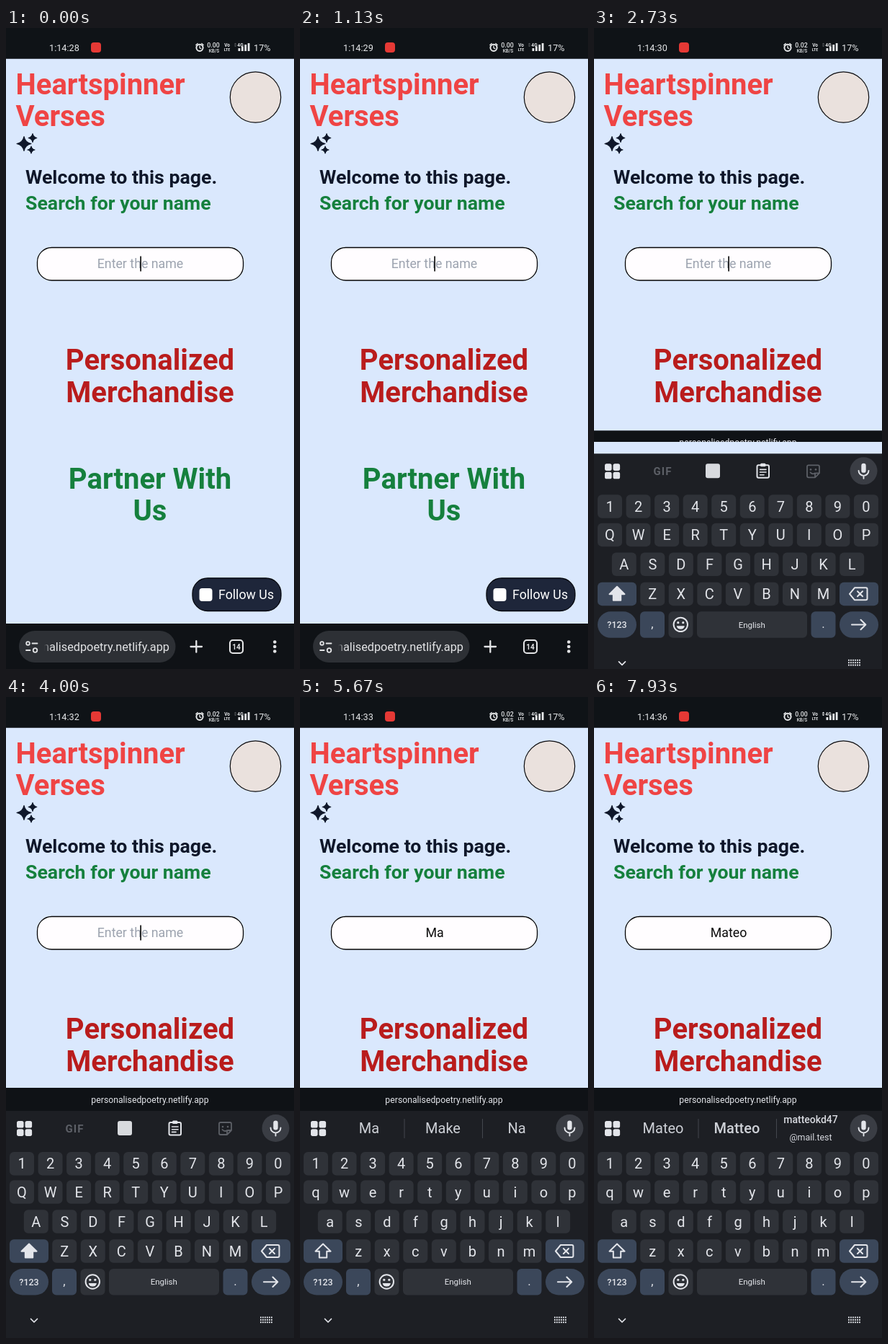
These frames come from a looping animation (400 by 889 pixels, 8000 ms). An HTML page:

```html
<!DOCTYPE html>
<html lang="en">
<head>
<meta charset="utf-8">
<title>Name search</title>
<style>
  html, body { margin: 0; width: 100%; height: 100%; overflow: hidden; background: #0f1317; }
  svg { display: block; width: 100%; height: 100%; font-family: Roboto, sans-serif; }
  .mid { text-anchor: middle; }
  .end { text-anchor: end; }
  .bold { font-weight: 700; }
  .med { font-weight: 500; }
  .line { fill: none; stroke-linecap: round; stroke-linejoin: round; }
</style>
</head>
<body>
<svg id="stage" viewBox="0 0 400 889" xmlns="http://www.w3.org/2000/svg"></svg>
<script>
const LOOP = 8000;
const KEY = '#2f3238', KEY_DOWN = '#50545d', BLUE = '#3b475a', INK = '#e3e5ea', BOARD = '#1d1f24';

// Steps are [time, value]; the last one reached holds.
const CLOCK = [[0, 28], [730, 29], [1800, 30], [2800, 31], [3800, 32], [4800, 33], [5800, 34], [6870, 35], [7800, 36]];
const SPEED = [[0, '0.00'], [2130, '0.02'], [6600, '0.00']];
const ARROWS = [[0, .3], [7800, 1]];
const CARET = [[0, 1], [330, 0], [830, 1], [1330, 0], [1830, 1], [2330, 0], [2430, 1], [3270, 0], [3770, 1],
  [4270, 0], [4670, 1], [5650, 0], [6060, 1], [7470, 0]];
const TYPED = [[0, ''], [4670, 'M'], [5150, 'Ma'], [6060, 'Mat'], [6500, 'Mate'], [6970, 'Mateo']];
const PRESSED = [[0, ''], [4530, 'm'], [4670, ''], [5070, 'a'], [5150, ''], [5930, 't'], [6060, ''],
  [6400, 'e'], [6500, ''], [6870, 'o'], [7000, '']];
const HINTS = {
  M: ['M', 'My', 'Me'], Ma: ['Ma', 'Make', 'Na'], Mat: ['Mat', 'Math', 'Match'],
  Mate: ['Mate', 'Matter', 'Make'], Mateo: ['Mateo', 'Matteo', 'matteokd47']
};
const SLIDE = { start: 2470, span: 400, height: 315 };

const at = (steps, t) => steps.reduce((v, s) => t >= s[0] ? s[1] : v, steps[0][1]);
const text = (x, y, size, fill, str, attrs = '') =>
  `<text x="${x}" y="${y}" font-size="${size}" fill="${fill}" ${attrs}>${str}</text>`;
const rect = (x, y, w, h, r, fill, attrs = '') =>
  `<rect x="${x}" y="${y}" width="${w}" height="${h}" rx="${r}" fill="${fill}" ${attrs}/>`;
const disc = (x, y, r, fill, attrs = '') => `<circle cx="${x}" cy="${y}" r="${r}" fill="${fill}" ${attrs}/>`;
const line = (d, color, w, attrs = '') => `<path class="line" d="${d}" stroke="${color}" stroke-width="${w}" ${attrs}/>`;
const MID = 'class="mid"', MID_BOLD = 'class="mid bold"', BOLD = 'class="bold"';

function star(x, y, r) {
  const k = r * .17;
  return `<path transform="translate(${x} ${y})" fill="#0f172a" stroke="#0f172a" stroke-width="1.2" stroke-linejoin="round"
    d="M0 ${-r}Q${k} ${-k} ${r} 0Q${k} ${k} 0 ${r}Q${-k} ${k} ${-r} 0Q${-k} ${-k} 0 ${-r}Z"/>`;
}

function statusBar() {
  const c = '#e6e8ea';
  const bars = [4, 6.5, 9, 11].map((h, i) => rect(322.5 + i * 4.4, 32 - h, 2.8, h, .6, c)).join('');
  return rect(0, 0, 400, 42.5, 0, '#0f1317') +
    text(60, 32, 12.7, c, '', 'id="clock"') +
    rect(118, 20, 14, 14, 4, '#e53935') +
    disc(269, 27.3, 4.6, 'none', `stroke="${c}" stroke-width="2"`) +
    line('M269 25v2.6l1.8 1M263.8 23.5l2.4-2M274.2 23.5l-2.4-2', c, 1.3) +
    text(288, 27, 8.8, c, '', 'id="speed" class="mid med"') +
    text(289, 33.6, 6.4, c, 'KB/S', 'class="mid med"') +
    text(307, 26.4, 6.4, c, 'Vo', MID_BOLD) + text(307, 32.4, 5.2, c, 'LTE', MID_BOLD) +
    `<path id="arrows" fill="${c}" d="M318.5 20.5l1.8 2.4h-3.6zM318.5 26.3l1.8-2.4h-3.6z"/>` +
    text(325.5, 26, 6.6, c, '4G', MID_BOLD) + bars +
    text(344, 32, 12.7, c, '17%');
}

function page() {
  return rect(0, 42.5, 400, 784, 0, '#dae8fd') +
    text(13.5, 91.5, 40, '#ef4444', 'Heartspinner', BOLD) +
    text(13.5, 136, 40, '#ef4444', 'Verses', BOLD) +
    star(25, 160.5, 10) + star(37, 152.5, 5.8) + star(35, 169, 5) +
    disc(346.5, 96, 35.2, '#eae1dd', 'stroke="#0b0b0d" stroke-width="1.2"') +
    text(27, 216, 26.7, '#0f172a', 'Welcome to this page.', BOLD) +
    text(27, 251.5, 26.7, '#15803d', 'Search for your name', BOLD) +
    rect(43.5, 304.5, 286, 45.5, 20, '#fffdff', 'stroke="#050505" stroke-width="1.3"') +
    text(186.5, 333.3, 17.8, '#9ca3af', 'Enter the name', MID + ' id="holder"') +
    text(187, 333.3, 17.8, '#0a0a0a', '', MID + ' id="entry"') +
    rect(0, 316.5, 1.6, 21, 0, '#000', 'id="caret"') +
    text(200, 474, 40, '#b91c1c', 'Personalized', MID_BOLD) +
    text(200, 518.5, 40, '#b91c1c', 'Merchandise', MID_BOLD) +
    text(200, 638.5, 40, '#15803d', 'Partner With', MID_BOLD) +
    text(200, 683, 40, '#15803d', 'Us', MID_BOLD) +
    rect(259, 763, 123, 45.5, 21, '#1e263a', 'stroke="#05070c" stroke-width="1.3"') +
    rect(268.5, 777, 18, 18, 4, '#fff') +
    text(295, 791.8, 17.8, '#fff', 'Follow Us');
}

function toolbar() {
  const c = '#e3e4e6', pill = '#2d3035';
  return rect(0, 826, 400, 63, 0, '#0f1216') +
    rect(18, 836, 217.5, 44, 22, pill) +
    `<g clip-path="url(#urlClip)">${text(227, 863.8, 16.3, c, 'personalisedpoetry.netlify.app', 'class="end"')}</g>` +
    rect(53, 842, 10, 32, 0, 'url(#fade)') +
    line('M36.5 853.5h7M28 863h5.5', c, 1.8) +
    disc(30.5, 853.5, 2.3, 'none', `stroke="${c}" stroke-width="1.8"`) +
    disc(40.5, 863, 2.8, 'none', `stroke="${c}" stroke-width="1.8"`) +
    line('M256.5 858h15.5M264.3 850.2v15.5', c, 2.3) +
    rect(311, 849, 18, 18, 4, 'none', `stroke="${c}" stroke-width="2.1"`) +
    text(320, 861.8, 10, c, '14', MID_BOLD) +
    [851.5, 858, 864.5].map(y => disc(373.3, y, 2.3, c)).join('');
}

function keyRow(letters, x, y) {
  return [...letters].map((ch, i) => {
    const cx = x + i * 39.55;
    return rect(cx - 17, y, 34, 32.5, 6, KEY, `data-cap="${ch}"`) +
      text(cx, y + 23.3, 20, INK, ch, MID + ` data-key="${ch}"`);
  }).join('');
}

function tools() {
  const dim = '#5d6067';
  return text(95.5, 603.5, 15, dim, 'GIF', 'class="mid bold" letter-spacing="1"') +
    rect(155, 588, 20, 20, 3, '#d8dade') +
    rect(226.5, 590, 16.5, 17.5, 2, 'none', `stroke="${INK}" stroke-width="2"`) +
    rect(231, 587.5, 7.5, 4.5, 1.5, INK) +
    line('M230.5 596h8.5M230.5 599.7h8.5M230.5 603.4h5.5', INK, 1.6) +
    line('M298 590h13q2 0 2 2v9l-6 6h-9q-2 0-2-2v-13q0-2 2-2zM313 601h-4q-2 0-2 2v4M300.5 600q3 3.5 6.5 1', dim, 1.8) +
    disc(301, 596, 1.3, dim) + disc(308, 596, 1.3, dim);
}

function hints() {
  return line('M145 585.5v26M253.5 585.5v26', '#44474e', 1) +
    [96, 198.5, 301].map((x, i) => text(x, 605, 20, '#cdd0d6', '', `${MID} id="hint${i}"`)).join('') +
    `<g id="mail">${text(301, 591, 14, '#d8dae0', 'matteokd47', 'class="mid med"')}
      ${text(301, 614.5, 12.4, '#d8dae0', '@mail.test', MID)}</g>`;
}

function keyboard() {
  const grid = [[15, 588], [26.5, 588], [15, 599.3], [26.5, 599.3]];
  const dots = [0, 1, 2].map(r => [0, 1, 2, 3, 4, 5].map(i =>
    rect(353 + i * 3, 859.5 + r * 3.4, 1.9, 1.9, 0, INK)).join('')).join('');
  return rect(0, 574, 400, 315, 0, BOARD) +
    grid.map(([x, y]) => rect(x, y, 9.6, 9.6, 2.6, INK)).join('') +
    `<g id="tools">${tools()}</g><g id="hints">${hints()}</g>` +
    disc(374.5, 598, 19, '#3a3d44') +
    rect(371.3, 587.5, 6.4, 13, 3.2, INK) +
    line('M367.5 597.5a7 7 0 0 0 14 0M374.5 604.5v4', INK, 1.9) +
    keyRow('1234567890', 22, 631) + keyRow('qwertyuiop', 22, 670.3) +
    keyRow('asdfghjkl', 41.8, 711.2) + keyRow('zxcvbnm', 81.2, 752.3) +
    rect(5, 752.3, 54, 32.5, 6, BLUE) +
    line('M32 758.5l10.5 10.3h-5.3v8.7h-10.4v-8.7h-5.3z', INK, 2, 'id="shift"') +
    rect(341, 752.3, 54, 32.5, 6, BLUE) +
    line('M362 760h15.500q2 0 2 2v13q0 2-2 2h-15.500l-7-8.500zM366 765l7 7M373 765l-7 7', INK, 2) +
    rect(5, 793, 54, 36.500, 18.200, BLUE) + text(32, 815.500, 12.500, INK, '?123', 'class="mid med"') +
    rect(64, 793, 34, 36.500, 6, BLUE) + text(81, 816, 17, INK, ',', MID) +
    rect(103.500, 793, 34, 36.500, 6, KEY) +
    disc(120.300, 811, 9.700, 'none', `stroke="${INK}" stroke-width="2"`) +
    disc(116.800, 808.300, 1.600, INK) + disc(123.800, 808.300, 1.600, INK) +
    `<path d="M114.800 813h11a5.500 4.500 0 0 1-11 0z" fill="${INK}"/>` +
    rect(143, 793, 153, 36.500, 6, KEY) + text(219.300, 815.200, 11.500, INK, 'English', MID) +
    rect(301.500, 793, 34, 36.500, 6, BLUE) + text(318.500, 816, 17, INK, '.', MID) +
    rect(341, 793, 54, 36.500, 18.200, BLUE) +
    line('M358 811.200h19M370.500 804.500l6.800 6.700l-6.800 6.700', INK, 2.100) +
    line('M34.500 862.500l4.500 4.500l4.500-4.500', INK, 1.700) + dots;
}

const stage = document.getElementById('stage');
stage.innerHTML = `<defs>
    <linearGradient id="fade"><stop offset="0" stop-color="#2d3035"/><stop offset="1" stop-color="#2d3035" stop-opacity="0"/></linearGradient>
    <clipPath id="urlClip"><rect x="53" y="840" width="180" height="36"/></clipPath>
    <clipPath id="viewClip"><rect width="400" height="574"/></clipPath>
  </defs>` + page() + toolbar() +
  `<g clip-path="url(#viewClip)"><g id="strip">${rect(0, 542, 400, 32, 0, '#0f1216')}
    ${text(200, 562.7, 12.25, INK, 'personalisedpoetry.netlify.app', MID)}</g></g>
  <g id="board">${keyboard()}</g>` + statusBar();

const $ = id => document.getElementById(id);
const show = (id, on) => $(id).setAttribute('visibility', on ? 'visible' : 'hidden');
const setText = (el, s) => { if (el.textContent !== s) el.textContent = s; };
const caps = [...stage.querySelectorAll('[data-cap]')];
const labels = [...stage.querySelectorAll('[data-key]')];

function draw(t) {
  setText($('clock'), '1:14:' + at(CLOCK, t));
  setText($('speed'), at(SPEED, t));
  $('arrows').setAttribute('opacity', at(ARROWS, t));

  const word = at(TYPED, t), entry = $('entry');
  setText(entry, word);
  $('holder').setAttribute('display', word ? 'none' : 'inline');
  $('caret').setAttribute('x', word ? 187 + entry.getComputedTextLength() / 2 - .8 : 186.3);
  show('caret', at(CARET, t));

  const p = Math.min(1, Math.max(0, (t - SLIDE.start) / SLIDE.span));
  const shift = `translate(0 ${SLIDE.height * (1 - p) ** 2.8})`;
  $('board').setAttribute('transform', shift);
  $('strip').setAttribute('transform', shift);

  $('tools').setAttribute('display', word ? 'none' : 'inline');
  $('hints').setAttribute('display', word ? 'inline' : 'none');
  const full = word === 'Mateo';
  (HINTS[word] || ['', '', '']).forEach((h, i) => setText($('hint' + i), full && i === 2 ? '' : h));
  $('hint1').setAttribute('font-weight', full ? 500 : 400);
  $('mail').setAttribute('display', full ? 'inline' : 'none');

  const down = at(PRESSED, t);
  caps.forEach(k => k.setAttribute('fill', k.dataset.cap === down ? KEY_DOWN : KEY));
  labels.forEach(k => setText(k, word ? k.dataset.key : k.dataset.key.toUpperCase()));
  $('shift').style.fill = word ? 'none' : INK;
}

const begin = performance.now();
function tick() {
  draw((performance.now() - begin) % LOOP);
  requestAnimationFrame(tick);
}
tick();
</script>
</body>
</html>
```
